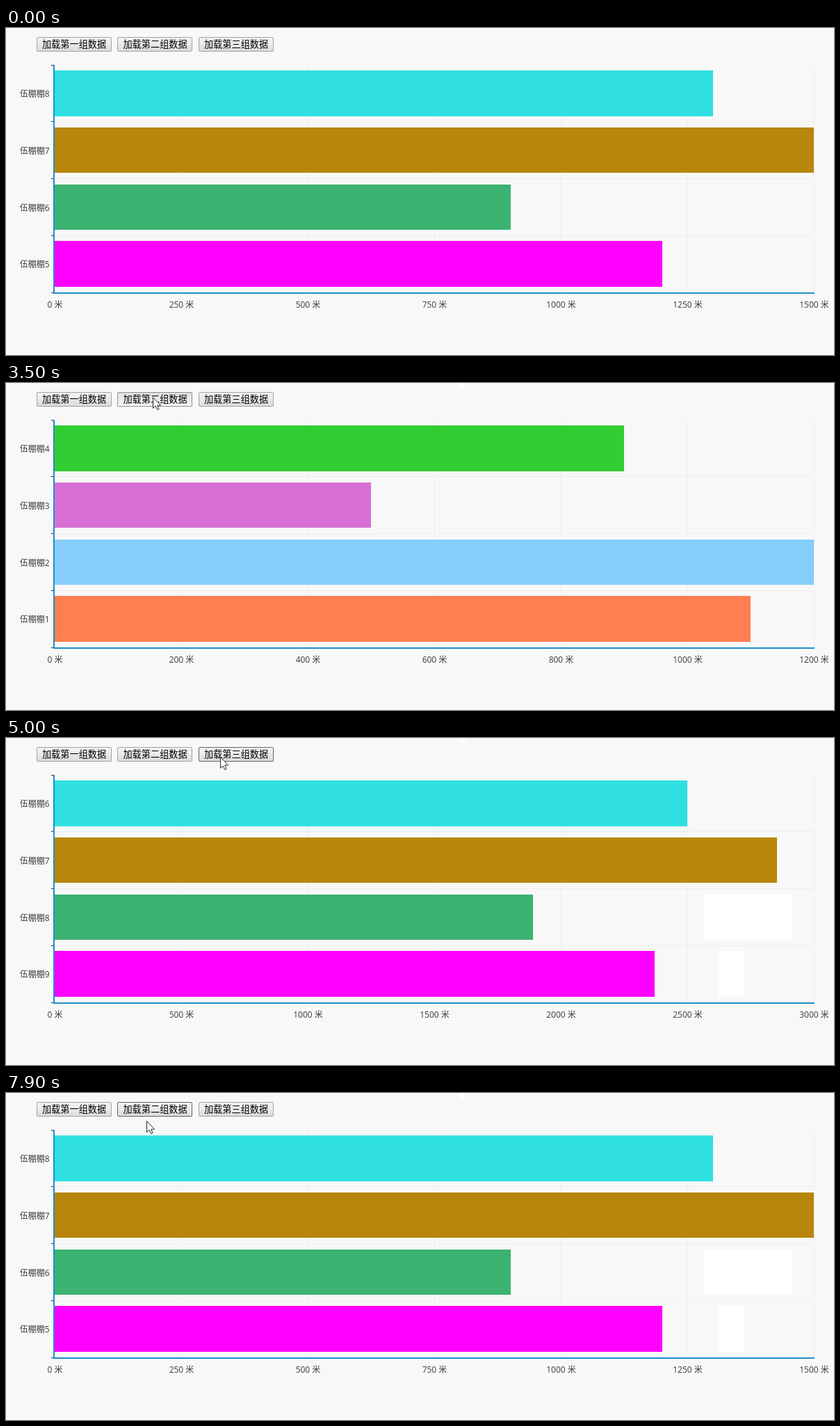
Animation of 1191 by 470 pixels, one loop 8 s. Source, as an HTML page:

```html
<!DOCTYPE html>
<html lang="zh">
<head>
<meta charset="utf-8">
<style>
  html, body { margin: 0; width: 100%; height: 100%; overflow: hidden; background: #f8f8f8; }
  svg { display: block; width: 1191px; height: 470px; }
  text { font: 12px "Open Sans", "Noto Sans CJK SC", "Noto Sans CJK", sans-serif; fill: #3c3c3c; text-anchor: middle; }
  .name { text-anchor: end; }
  .caption { font: 13.2px "Noto Sans CJK SC", "Noto Sans CJK", sans-serif; fill: #000; }
</style>
</head>
<body>
<svg id="stage" viewBox="0 0 1191 470">
  <defs>
    <linearGradient id="raised" x2="0" y2="1">
      <stop offset="0" stop-color="#f3f3f3"/><stop offset=".45" stop-color="#ebebeb"/><stop offset="1" stop-color="#dadada"/>
    </linearGradient>
    <linearGradient id="pressed" x2="0" y2="1">
      <stop offset="0" stop-color="#dedede"/><stop offset="1" stop-color="#f8f8f8"/>
    </linearGradient>
  </defs>
</svg>
<script>
const LOOP = 8000, STEP = 100;
const LEFT = 70, WIDTH = 1092, TOP = 53, PITCH = 81.75, BAR = .8;
const PERSON = '伍棚棚';
const stage = document.getElementById('stage');

const bright = ['#30e0e0', '#b8860b', '#3cb371', '#ff00ff'];
const groups = [
  { max: 1200, ids: [4, 3, 2, 1], values: [900, 500, 1200, 1100], colors: ['#32cd32', '#da70d6', '#87cefa', '#ff7f50'] },
  { max: 1500, ids: [8, 7, 6, 5], values: [1300, 1500, 900, 1200], colors: bright },
  { max: 3000, ids: [6, 7, 8, 9], values: [1200, 1000, 3000, 2000], colors: bright }
];

// Each visit hovers a button, presses it and loads its group.
// The bars creep for a while, then run at full pace (no pace: they jump).
const visits = [
  { group: 0, enter: 1300, press: 2100, load: 2300, leave: 2900 },
  { group: 1, enter: 3100, press: 3500, load: 3600, leave: 4300, creep: 100, pace: 843, trail: 1 },
  { group: 2, enter: 4700, press: 4800, load: 5000, leave: 5700, creep: 300, pace: 384, trail: .25 },
  { group: 1, enter: 5900, press: 6300, load: 6600, leave: LOOP, creep: 400, pace: 167, trail: 1 }
];
visits.forEach((visit, i) => visit.from = i ? visits[i - 1].group : 1);

const moves = [
  { start: 200, end: 300, to: [651, -9] },
  { start: 700, end: 700, to: [1, 7] },
  { start: 700, end: 1000, to: [101, 20] },
  { start: 2700, end: 3100, to: [211, 20] },
  { start: 4100, end: 4500, to: [308, 27] },
  { start: 5500, end: 5900, to: [235, 25] },
  { start: 7500, end: 7900, to: [202, 40] }
];

const CREEP_START = .025, CREEP_END = .14;
const cubicOut = k => 1 - (1 - k) ** 3;
const mix = (a, b, k) => a + (b - a) * k;

function progress({ load, creep, pace }, t) {
  if (!pace) return 1;
  const u = t - load;
  return cubicOut(u < creep
    ? mix(CREEP_START, CREEP_END, (u / creep) ** 4)
    : Math.min(1, CREEP_END + (u - creep) / pace));
}

const share = (group, row) => groups[group].values[row] / groups[group].max;
const barWidth = ({ from, group }, row, done) =>
  Math.ceil(WIDTH * mix(share(from, row), share(group, row), done) - .01);

function set(node, attrs) {
  for (const key in attrs) node.setAttribute(key, attrs[key]);
}
function add(tag, attrs, text) {
  const node = document.createElementNS('http://www.w3.org/2000/svg', tag);
  set(node, attrs);
  if (text) node.textContent = text;
  return stage.appendChild(node);
}
const show = (node, on) => set(node, { visibility: on ? 'visible' : 'hidden' });
const line = (d, stroke, width = 1) => add('path', { d, stroke, 'stroke-width': width, fill: 'none' });
const rows = [0, 1, 2, 3];
const rowEdge = row => Math.floor(TOP + row * PITCH) + .5;

function addBar(row, attrs) {
  const top = TOP + PITCH * (row + (1 - BAR) / 2);
  const y = Math.round(top);
  return add('rect', { y, height: Math.round(top + PITCH * BAR) - y, ...attrs });
}

// A shrinking bar leaves a pale patch where it crept.
const trails = [];
for (const visit of visits.filter(v => v.pace)) {
  for (const row of rows) {
    const wide = barWidth(visit, row, cubicOut(CREEP_START));
    const narrow = barWidth(visit, row, cubicOut(CREEP_END));
    if (narrow < wide) {
      const node = addBar(row, { x: LEFT + narrow, width: wide - narrow, fill: '#fff', opacity: visit.trail });
      trails.push({ node, start: visit.load + visit.creep });
    }
  }
}

for (let i = 1; i <= 6; i++) line(`M${LEFT + i * 182 + .5} 53V381`, '#eee');
for (let i = 1; i <= 3; i++) line(`M70 ${rowEdge(i)}H1162`, '#eee');

const bars = rows.map(row => addBar(row, { x: LEFT }));
for (let i = 0; i <= 4; i++) line(`M65 ${rowEdge(i)}H69`, '#333');
line('M69 53V382', '#1e8ecb', 2);
line('M69 381H1163', '#1e8ecb', 2);

const names = rows.map(row => add('text', { class: 'name', x: 62.5, y: 99 + row * PITCH }));
const scale = Array.from({ length: 7 }, (_, i) => add('text', { x: LEFT + .5 + i * 182, y: 402 }));

const buttons = ['一', '二', '三'].map((word, i) => {
  const x = 43.7 + i * 116.5;
  const box = add('rect', { x: Math.round(x) + .5, y: 13.5, width: 107, height: 20, rx: 1.5 });
  add('text', { class: 'caption', x: x + 54.4, y: 28 }, `加载第${word}组数据`);
  return box;
});

const arrow = 'M.5 .5V16.3L4.1 13L6.6 18.5L9.1 17.4L6.7 12.1H11.6Z';
const ghost = add('path', { d: arrow, fill: '#fff', stroke: '#fff', transform: 'translate(651 -9)' });
const pointer = add('path', { d: arrow, fill: '#fff', stroke: '#26263a' });

function pointerAt(t) {
  let spot = [962, 8];
  for (const { start, end, to } of moves) {
    if (t < start) break;
    const k = t < end ? (t - start) / (end - start) : 1;
    spot = spot.map((v, axis) => mix(v, to[axis], k));
  }
  return spot.map(Math.round);
}

function drawChart(t) {
  const visit = visits.filter(v => v.load <= t).pop() ?? { from: 1, group: 1 };
  const group = groups[visit.group], done = progress(visit, t);
  rows.forEach(row => {
    set(bars[row], { width: barWidth(visit, row, done), fill: group.colors[row] });
    names[row].textContent = PERSON + group.ids[row];
  });
  scale.forEach((label, i) => label.textContent = `${group.max / 6 * i} 米`);
  trails.forEach(({ node, start }) => show(node, t >= start));
}

function drawButtons(t) {
  const visit = visits.find(v => t >= v.enter && t < v.leave);
  buttons.forEach((box, i) => {
    const hover = visit?.group === i;
    const down = hover && t >= visit.press && t < visit.load;
    set(box, {
      fill: down ? 'url(#pressed)' : 'url(#raised)',
      stroke: down ? '#8f8f8f' : hover ? '#666' : '#a3a3a3'
    });
  });
}

function draw(time) {
  const t = Math.floor((time % LOOP) / STEP) * STEP;
  drawChart(t);
  drawButtons(t);
  show(ghost, t >= 400);
  show(pointer, t >= 700 || (t >= 200 && t < 400));
  set(pointer, { transform: `translate(${pointerAt(t)})` });
}

let origin;
function tick(now) {
  origin ??= now;
  draw(now - origin);
  requestAnimationFrame(tick);
}
draw(0);
requestAnimationFrame(tick);
</script>
</body>
</html>
```
